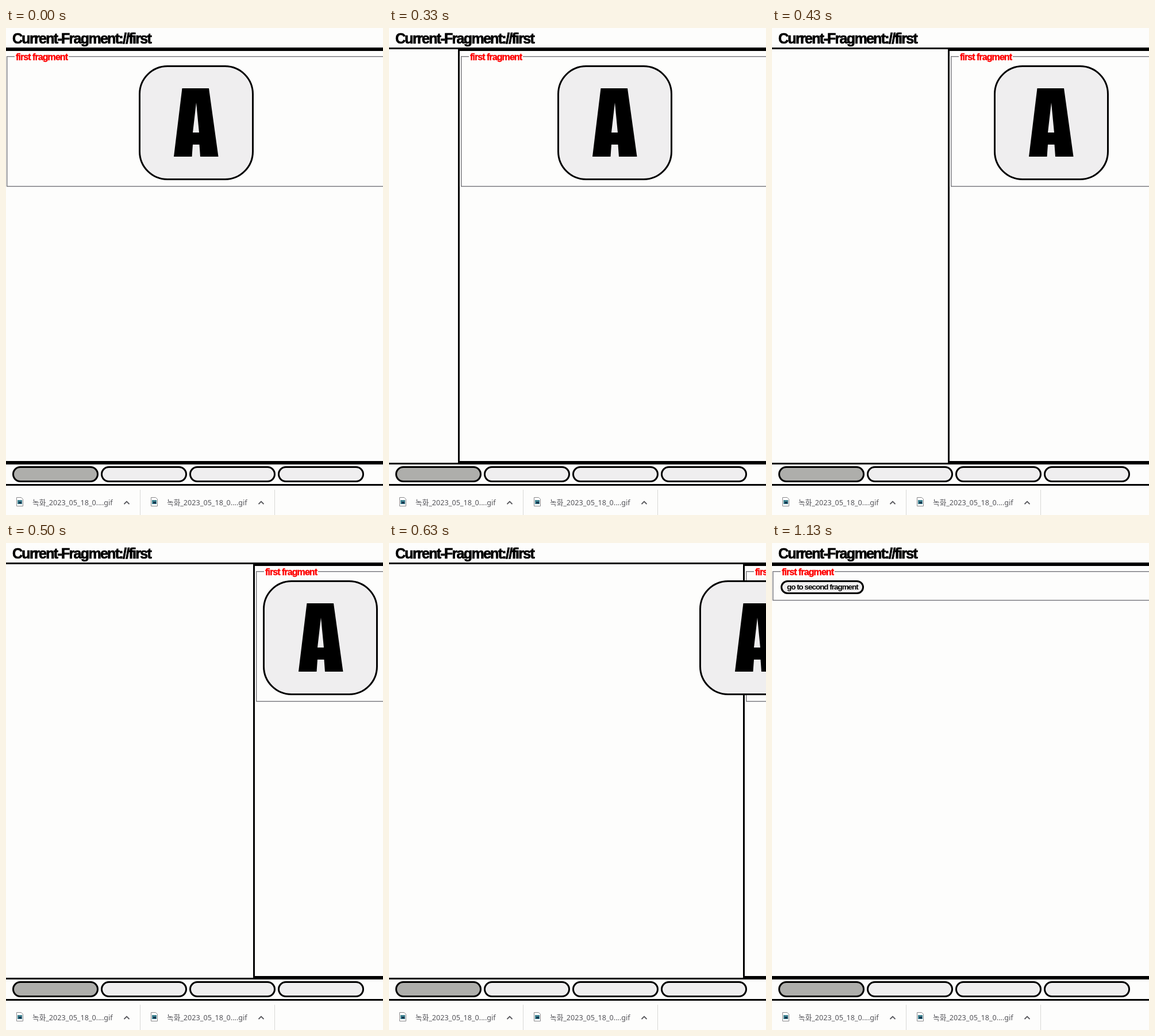
Recreate the animation shown at these times as an HTML page with a canvas. Size 656 by 848 pixels, loop 2130 ms.

```html
<!DOCTYPE html>
<html lang="en">
<head>
<meta charset="utf-8">
<title>Fragment transition</title>
<style>
html, body { margin: 0; width: 100%; height: 100%; overflow: hidden; background: #fdfdfc; }
canvas { display: block; }
</style>
</head>
<body>
<canvas id="stage" width="656" height="848"></canvas>
<script>
const ctx = document.getElementById("stage").getContext("2d");

const LOOP = 2130;
const START = 235, TICK = 38;     // the slide advances in timer ticks
const STEP = 61.95, STEPS = 11;   // pixels per tick, ticks per half

const PAPER = "#fdfdfc", INK = "#000", FILL = "#efeeef", ACTIVE = "#aeaeab";
const HEAVY = '"Liberation Sans", Arial, sans-serif';
const PLAIN = '"Noto Sans", "Noto Sans CJK KR", sans-serif';

function rect(x, y, w, h, color) {
  ctx.fillStyle = color;
  ctx.fillRect(x, y, w, h);
}

function text(str, x, y, font, color, spacing = 0, weight = 0) {
  ctx.font = font;
  ctx.letterSpacing = spacing + "px";
  ctx.fillStyle = ctx.strokeStyle = color;
  ctx.fillText(str, x, y);
  if (weight) {
    ctx.lineWidth = weight;
    ctx.strokeText(str, x, y);
  }
}

// Filled rounded box with a 3px border inside its bounds
function box(x, y, w, h, r, fill) {
  ctx.beginPath();
  ctx.roundRect(x + 1.5, y + 1.5, w - 3, h - 3, r - 1.5);
  ctx.fillStyle = fill;
  ctx.fill();
  ctx.lineWidth = 3;
  ctx.strokeStyle = INK;
  ctx.stroke();
}

function polygon(points) {
  points.forEach(([x, y], i) => i ? ctx.lineTo(x, y) : ctx.moveTo(x, y));
  ctx.closePath();
}

// Card and letter snap to whole pixels separately
function letterCard(shift) {
  box(Math.round(230.65 + shift), 65, 200, 200, 50, FILL);
  ctx.save();
  ctx.translate(Math.round(292 + shift), 105);
  ctx.beginPath();
  polygon([[14.5, 0], [61, 0], [77.5, 119], [46, 119], [44.5, 98], [33, 98], [31.5, 119], [0, 119]]);
  polygon([[39, 25], [33, 77], [44, 77]]);
  ctx.fillStyle = INK;
  ctx.fill("evenodd");
  ctx.restore();
}

function fieldset(x, bottom) {
  const dark = "#737378", light = "#c9c9cb";
  const w = 656 - x, h = bottom - 49;
  rect(x + 1, 49, w, 1, dark);
  rect(x + 2, 50, w, 1, light);
  rect(x + 1, 49, 1, h, dark);
  rect(x + 2, 50, 1, h - 2, light);
  rect(x + 2, bottom - 2, w, 1, dark);
  rect(x + 1, bottom - 1, w, 1, light);
  rect(x + 15, 48, 94, 4, PAPER);
  text("first fragment", x + 17, 56, "bold 16px " + HEAVY, "#f00", -0.93, 0.4);
}

function panel(offset, showLetter) {
  const x = Math.round(offset);
  rect(x - 4, 37, 664 - x, 3, INK);
  rect(x - 4, 754, 664 - x, 3, INK);
  rect(x - 4, 37, 3, 720, INK);
  fieldset(x, showLetter ? 277 : 101);
  if (showLetter) {
    letterCard(offset / 2);
  } else {
    box(x + 15, 65, 145, 24, 12, FILL);
    text("go to second fragment", x + 26, 81, "bold 13.33px " + HEAVY, INK, -0.95);
  }
}

function download(x) {
  ctx.lineWidth = 1;
  ctx.strokeStyle = "#88888a";
  ctx.fillStyle = "#fff";
  ctx.beginPath();
  polygon([[x + 18.5, 817.5], [x + 26.5, 817.5], [x + 29.5, 820.5], [x + 29.5, 832.5], [x + 18.5, 832.5]]);
  ctx.fill();
  ctx.stroke();
  rect(x + 20, 822, 8, 7, "#3d8290");
  rect(x + 22, 825, 5, 3, "#17344e");

  text("녹화_2023_05_18_0....gif", x + 46, 831, "12.65px " + PLAIN, "#55555a");

  ctx.beginPath();
  ctx.moveTo(x + 205.5, 829);
  ctx.lineTo(x + 210, 824.5);
  ctx.lineTo(x + 214.5, 829);
  ctx.lineWidth = 1.8;
  ctx.strokeStyle = "#58585c";
  ctx.stroke();
  rect(x + 233, 804, 1, 44, "#d8d8d6");
}

function frame() {
  text("Current-Fragment://first", 11, 27, "bold 25px " + HEAVY, INK, -1.7, 0.7);
  rect(0, 34, 656, 3, INK);
  rect(0, 757, 656, 3, INK);
  rect(0, 794, 656, 3, INK);
  for (let i = 0; i < 4; i++) box(11 + 154 * i, 763, 150, 28, 14, i ? FILL : ACTIVE);
  download(0);
  download(234);
}

function draw(t) {
  const n = Math.max(0, Math.min(2 * STEPS, Math.floor((t - START) / TICK)));
  const leaving = n < STEPS;
  rect(0, 0, 656, 848, PAPER);
  panel(STEP * (leaving ? n : n - 2 * STEPS), leaving);
  frame();
}

const begin = performance.now();
function loop() {
  draw((performance.now() - begin) % LOOP);
  requestAnimationFrame(loop);
}
loop();
</script>
</body>
</html>
```
